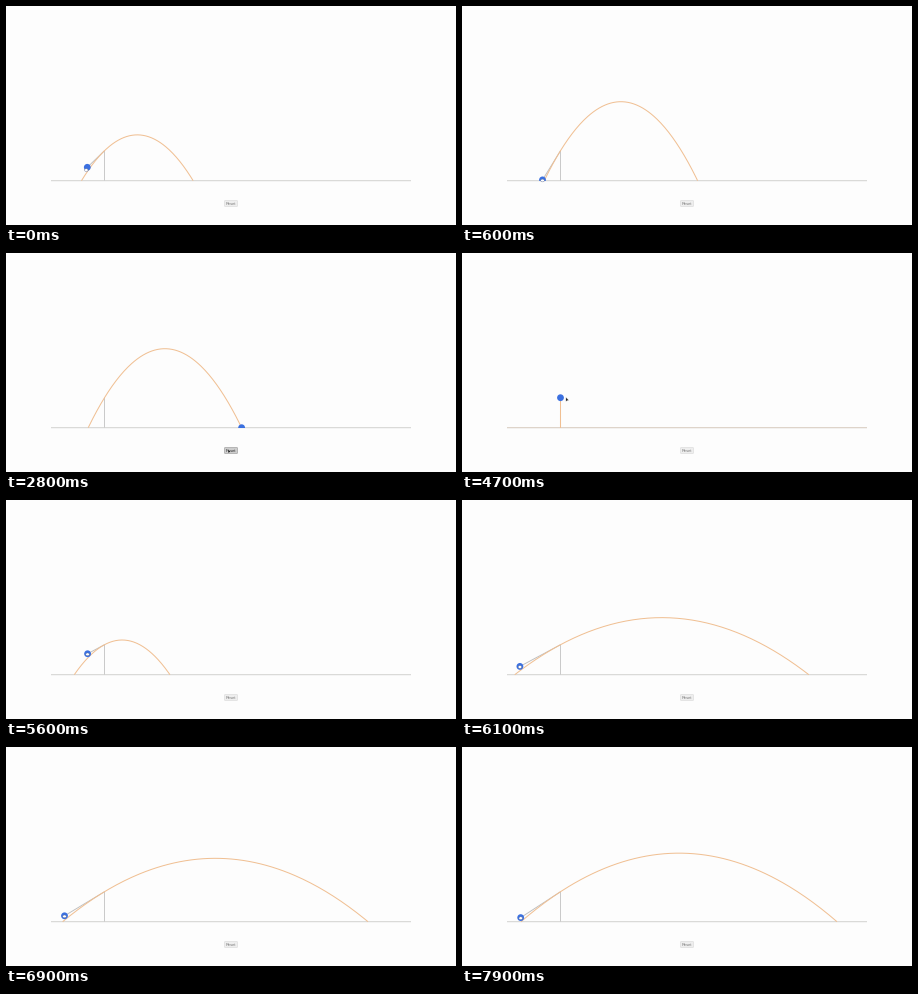
A matplotlib script that plays this animation: 450 by 219 pixels, repeating every 8 s.

```python
import numpy as np
import matplotlib.pyplot as plt
from matplotlib.animation import FuncAnimation
from matplotlib.patches import Circle, Ellipse, FancyBboxPatch, Polygon, Rectangle

W, H, DPI = 450, 219, 100
STEP, LOOP = 100, 8000
PX = 72 / DPI

POST = np.array([98.5, 144.7])
GROUND = 174.7
BEND = 4.35                    # curvature of the path times the squared pull
OMEGA = 0.00533                # spring rate per ms
LAUNCH, PRESS, RESET, GRAB = 1030, 2800, 3800, 5200

ORANGE, BLUE = "#f0bf92", "#3b70e0"

# Key poses: time, x, y. Pulls are measured left and down from the post.
FIRST_PULL = [(0, 17.2, 16.6), (500, 18, 29.2)]
SECOND_PULL = [(GRAB, 0, 0), (6100, 40.6, 21.7), (6500, 41.8, 27),
               (6900, 40, 24.1), (7700, 39.8, 25.9)]
POINTER = [(1800, 82, 173), (2700, 222, 196), (3700, 222, 196),
           (4300, 123, 144.5), (4400, 123, 144.5), (5100, 99.5, 144.2)]


def smooth(u):
    return u * u * (3 - 2 * u)


def ease_out(u):
    return 1 - (1 - u) ** 3


def glide(keys, t, ease):
    """Eased position between key poses, held before and after them."""
    pos = np.array(keys[0][1:], float)
    for (t0, *a), (t1, *b) in zip(keys, keys[1:]):
        u = np.clip((t - t0) / (t1 - t0), 0, 1)
        pos += np.subtract(b, a) * ease(u)
    return pos


def path_y(x, pull):
    dx, dy = pull
    u = (x - POST[0]) / dx
    return POST[1] - dy * u + BEND * u ** 2


def ground_hits(pull):
    dx, dy = pull
    mid = POST[0] + dx * dy / (2 * BEND)
    half = dx * np.sqrt((GROUND - POST[1] + dy ** 2 / (4 * BEND)) / BEND)
    return mid - half, mid + half


def ball_at(t, pull):
    """Held on the band, then spring release, free flight and rest."""
    held = POST + pull * (-1, 1)
    if not LAUNCH < t < RESET:
        return held, True
    phase = OMEGA * (t - LAUNCH)
    if phase < np.pi / 2:
        return POST + (held - POST) * np.cos(phase), True
    x = POST[0] + pull[0] * (phase - np.pi / 2)
    x = min(x, ground_hits(pull)[1])
    return np.array([x, path_y(x, pull)]), False


fig = plt.figure(figsize=(W / DPI, H / DPI), dpi=DPI, facecolor="#fdfdfd")
ax = fig.add_axes([0, 0, 1, 1])
ax.set_xlim(0, W)
ax.set_ylim(H, 0)
ax.axis("off")


def line(xs, ys, color, width, z):
    return ax.plot(xs, ys, color=color, lw=width * PX, zorder=z, snap=False,
                   solid_capstyle="butt")[0]


line([45, 405], [GROUND, GROUND], "#d2d2d0", 1, 1)
line([POST[0]] * 2, [POST[1], GROUND], "#cacaca", 1, 1)
tint = line([45, 405], [GROUND, GROUND], ORANGE, 1, 2)
tint.set_alpha(0.25)
band = line([], [], "#bdbdbd", 0.9, 3)
curve = line([], [], ORANGE, 1, 4)

ball = Circle((0, 0), 3.4, fc=BLUE, ec="none", zorder=5)
ax.add_patch(ball)
ball.set_clip_path(Rectangle((0, 0), W, GROUND + 0.5, transform=ax.transData))

button = FancyBboxPatch((219, 195), 12, 5, boxstyle="round,pad=0.5,rounding_size=0.8",
                        lw=0.6 * PX, zorder=5)
ax.add_patch(button)
label = ax.text(225, 197.6, "Reset", fontsize=4 * PX, family="Liberation Sans",
                ha="center", va="center", zorder=6)

ARROW = np.array([(0, 0), (0, 4.2), (1.3, 3.4), (2.9, 3)])
arrow = Polygon(ARROW, fc="#202020", ec="white", lw=0.3 * PX, zorder=8)
hand = Ellipse((0, 0), 3.6, 2.8, fc="white", ec="#5c6b92", lw=0.4 * PX, zorder=8)
ax.add_patch(arrow)
ax.add_patch(hand)


def draw(i):
    t = i * STEP
    pull = glide(FIRST_PULL if t < RESET else SECOND_PULL, t, smooth)
    pull[0] = max(pull[0], 0.01)
    pos, tied = ball_at(t, pull)

    xs = np.linspace(*ground_hits(pull), 160)
    curve.set_data(xs, path_y(xs, pull))
    ball.center = pos
    band.set_data([pos[0], POST[0]], [pos[1], POST[1]])
    band.set_visible(tied)
    tint.set_visible(RESET <= t <= GRAB)

    holding = t < LAUNCH or t >= 5000
    lag = max(0, 1 - t / 500)
    hand.center = pos + (-lag, 0.6 + 2.2 * lag)
    hand.set_visible(holding)
    arrow.set_xy(ARROW + glide(POINTER, t, ease_out))
    arrow.set_visible(not holding)

    pressed = PRESS <= t < RESET
    button.set_facecolor("#cdcdcd" if pressed else "#eeeeee")
    button.set_edgecolor("#989898" if pressed else "#dadada")
    label.set_color("#222222" if pressed else "#777777")
    return curve, ball, band, tint, hand, arrow, button, label


anim = FuncAnimation(fig, draw, frames=LOOP // STEP, interval=STEP,
                     repeat=True, repeat_delay=0, blit=False)
plt.show()
```
